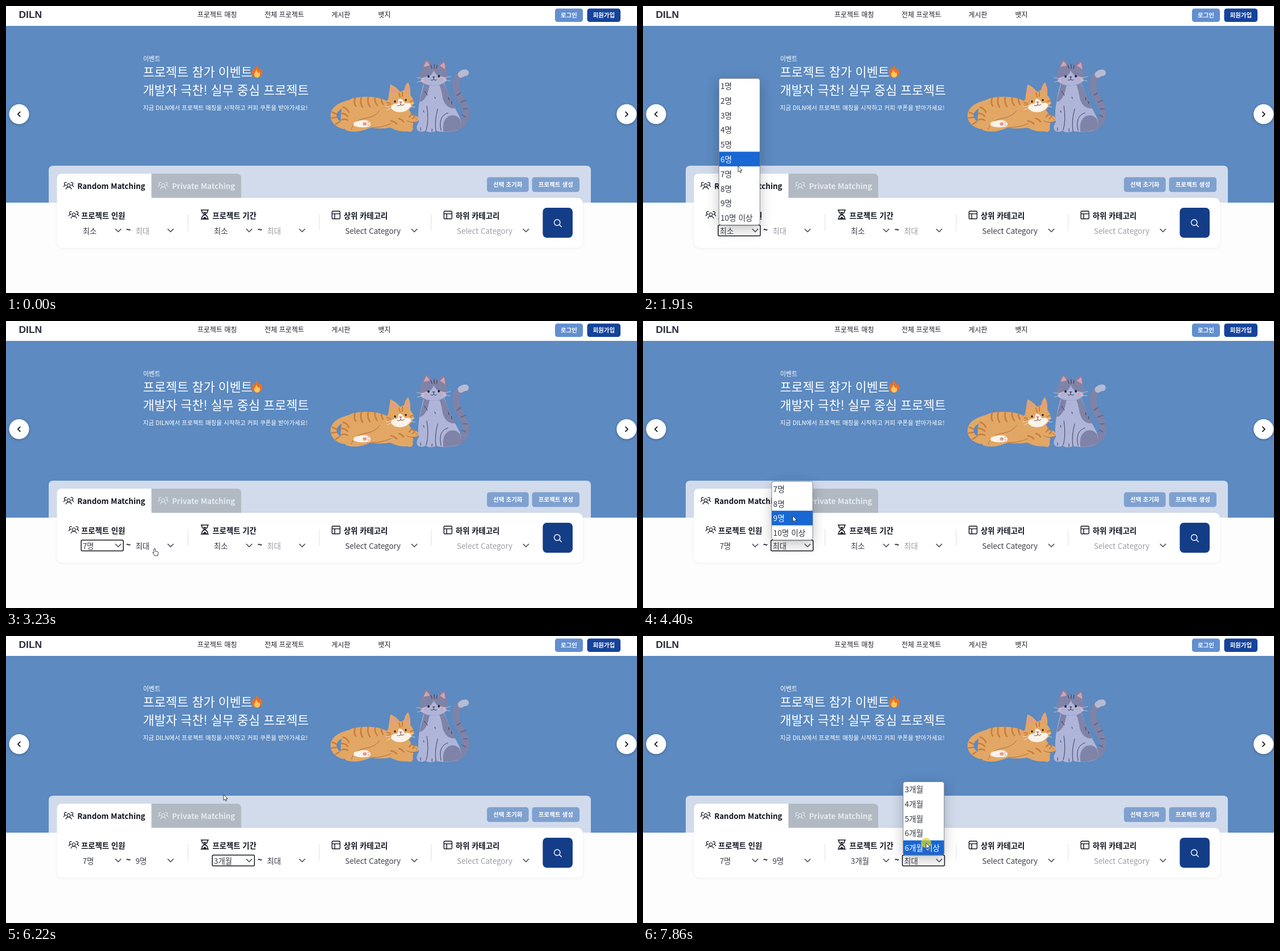
Animation, 1108 px wide and 505 px high, one loop 7.99 s. Source, as an HTML page:

```html
<!DOCTYPE html>
<html lang="ko">
<head>
<meta charset="utf-8">
<title>Project matching</title>
<style>
  html, body { margin: 0; width: 100%; height: 100%; overflow: hidden; background: #fdfdfd; }
  svg { display: block; width: 1108px; height: 505px; }
  text { font-family: "Noto Sans CJK KR", "Noto Sans CJK", "Noto Sans", sans-serif; white-space: pre; }
  .list { filter: drop-shadow(0 7px 11px rgba(0, 0, 0, .24)); }
  .knob { filter: drop-shadow(0 1px 2px rgba(0, 0, 0, .3)); }
  .card { filter: drop-shadow(0 1px 2px rgba(40, 50, 80, .09)); }
  .line { fill: none; stroke-linecap: round; stroke-linejoin: round; }
</style>
</head>
<body>
<svg id="stage" viewBox="0 0 1108 505"></svg>
<script>
const LOOP = 7990, ROW = 25.8, LIST_END = 385.4;
const INK = '#10131f', GREY = '#9b9da5', BODY = '#3b3d49';

const text = (x, y, s, size, fill, weight = 400, anchor = 'start') =>
  `<text x="${x}" y="${y}" font-size="${size}" fill="${fill}" font-weight="${weight}" text-anchor="${anchor}">${s}</text>`;
const box = (x, y, w, h, r, fill, extra = '') =>
  `<rect x="${x}" y="${y}" width="${w}" height="${h}" rx="${r}" fill="${fill}" ${extra}/>`;
const shape = (d, fill) => `<path d="${d}" fill="${fill}"/>`;
const line = (d, stroke, width = 1) => `<path class="line" d="${d}" stroke="${stroke}" stroke-width="${width}"/>`;
const oval = (x, y, rx, ry, fill) => `<ellipse cx="${x}" cy="${y}" rx="${rx}" ry="${ry}" fill="${fill}"/>`;
const chevron = x => line(`M${x - 4.7} 392.7l4.7 4.7 4.7-4.7`, '#5d606e', 1.8);
const button = (x, y, w, h, fill, label, size) =>
  box(x, y, w, h, 4.5, fill) + text(x + w / 2, y + h / 2 + 3.7, label, size, '#fff', 700, 'middle');

const people = (x, y, color) => `<g transform="translate(${x} ${y})">` +
  `<circle class="line" r="2.9" cy="-.4" stroke="${color}" stroke-width="1.2"/>` +
  line('M-4.8 6.2Q-4.2 2.7 0 2.7T4.8 6.2M-4-5.4A2.4 2.4 0 1 0-5-.9Q-7.8-.6-8.7 2M4-5.4A2.4 2.4 0 1 1 5-.9Q7.8-.6 8.7 2', color, 1.2) + '</g>';
const layout = x => line(`M${x + 1.5} 361h11q1.5 0 1.5 1.5v10.5q0 1.5-1.5 1.5h-11q-1.5 0-1.5-1.5v-10.5q0-1.5 1.5-1.5zM${x} 365.6h14M${x + 4.8} 365.6v9`, INK, 1.4);
const hourglass = line('M342.5 359h13M342.5 375h13M344 359v3q0 2 5 5q5-3 5-5v-3M344 375v-3q0-2 5-5q5 3 5 5v3', INK, 1.5) +
  shape('M345.5 362.5h7l-3.5 3zM345 374.5l4-4 4 4z', INK);

function orangeCat() {
  const fur = '#e2a765', dark = '#c87d3f', cream = '#fbf3ea', pink = '#e59a8f';
  const stripes = ['M613 162q-3 8 1 14', 'M624 160q-3 10 2 18', 'M636 160q-2 10 3 17', 'M648 161q-1 8 4 14',
    'M659 163q0 6 3 10', 'M592 178q7 2 10 9', 'M588 189q8 0 12 5', 'M590 200q6-2 10 1', 'M573 187l7 3', 'M572 197l8-1', 'M579 208l6-4',
    'M676 202q6 1 10 5', 'M690 198q6 2 8 6', 'M712 189q-1 4-4 6', 'M718 192q-1 4-4 6'];
  return line('M605 170Q575 177 575 193Q576 206 592 211', fur, 10.5) +
    shape('M588 192C589 168 605 160 628 160C650 159 664 163 674 171L705 180C717 192 717 209 712 219Q693 224 675 214Q655 217 640 214Q616 225 598 219Q586 210 588 192Z', fur) +
    line('M698 190Q708 198 719 199', fur, 11) + line('M692 208Q700 214 709 216', fur, 11) +
    stripes.map(d => line(d, dark, 2.6)).join('') +
    line('M606 217Q612 201 628 198Q648 196 656 184M642 214Q660 214 676 207M704 202Q713 207 722 203M719 197l3 3', '#a9683a', .9) +
    shape('M611 205Q624 199 636 202Q643 207 638 212Q622 216 610 210Z', cream) +
    oval(630, 207.5, 3.5, 3, pink) + oval(636, 204.5, 1.2, 1.2, pink) + oval(636.5, 209.5, 1.2, 1.2, pink) +
    shape('M671 164L675 138Q684 141 692 151L699 148Q701 138 706 134Q711 143 710 157Q716 163 716 171Q708 188 692 188Q672 187 667 173Q668 167 671 164Z', fur) +
    shape('M675 154L678 143Q684 146 687 151ZM701 148L705.5 139Q708 147 707 154Z', pink) +
    shape('M690 163Q697 163 700 171Q712 169 711 176Q704 187 692 187Q679 186 676 179Q678 171 687 172Z', cream) +
    line('M690 153l2 7M696 151l0 8M669 170l6 1M670 175l5-1M715 166l-5 2', dark, 2) +
    oval(683, 168, 1.6, 2, '#2a211e') + oval(702, 165.5, 1.6, 2, '#2a211e') +
    shape('M690 168h6l-3 3.5z', '#d9726b') + line('M693 171.5v2.5q-3 3-6 1M693 174q3 2 6-.5', '#5b3a31', .9) +
    line('M679 175l-12 2M680 178l-11 5M706 173l11-2M707 176l11 2', '#fff', .6);
}

function greyCat() {
  const pale = '#afb5d8', dark = '#7f83a8', ink = '#32344d', pink = '#d9a0ae';
  return line('M788 215C809 207 813 188 801 169C786 146 786 127 803 118', dark, 12) +
    line('M799 120.5Q803 117 807 117.5', '#b7bbd2', 11.5) +
    line('M792 157l6-4M799 169l8-3M803 181l7 0M801 192l6 3', '#65698d', 2.2) +
    shape('M734 134C728 155 721 185 725 204Q718 215 724 220Q731 223 737 219Q744 225 755 220Q780 224 795 217Q802 207 796 194Q783 171 769 134Z', pale) +
    shape('M768 134Q778 157 790 180Q773 182 767 163Q764 145 761 139ZM734 138Q729 157 726 169Q736 167 741 151L744 138Z', dark) +
    shape('M768 221Q765 202 777 194Q789 189 797 199Q801 210 795 217Q781 222 768 221Z', dark) +
    line('M738 218Q743 200 739 176M755 220Q752 203 758 181M764 219Q758 194 776 188M728 214v5M748 216v5', ink, .9) +
    shape('M727 119Q731 101 738 92Q745 97 748 104L757 104Q764 97 770 95Q774 106 774 117Q779 130 768 137Q752 143 734 138Q722 131 727 119Z', dark) +
    shape('M733 107L738 97Q742 100 744 105ZM762 105L769 99Q771 104 771 111Z', pink) +
    shape('M751 113Q755 124 766 124Q775 126 773 132Q765 140 750 140Q734 139 728 132Q729 125 739 124Q749 123 751 113Z', pale) +
    oval(736, 130, 3.5, 2, pink) + oval(766, 129, 3.5, 2, pink) +
    oval(742, 124, 1.9, 2.2, '#22233a') + oval(760, 123.5, 1.9, 2.2, '#22233a') +
    shape('M748.5 124h5l-2.5 3z', '#4d3e57') + line('M751 127v2q-2 3-5 1M751 129q2 3 5 1', ink, 1) +
    line('M746 104l2 6M752 103v7M757 104l-1 6M735 150l2 3M738 154l2 3M777 161l1 4M782 168l1 4M753 160l1 3M733 184l1 3', ink, 1) +
    line('M734 128l-13-2M734 131l-12 3M768 127l13-3M768 130l12 2', '#e4e6f2', .6);
}

const flame = shape('M440 126Q431 125 432 116Q433 111 436 108Q436 112 438 113Q437 107 442 104Q442 109 446 112Q447 111 447 109Q451 114 450 119Q448 126 440 126Z', '#e8702a') +
  shape('M441 126Q435 125 436 119Q438 116 440 112Q441 117 444 118L445 116Q447 121 445 124Q443 126 441 126Z', '#fbc85a');

const knob = (x, dir) => `<circle class="knob" cx="${x}" cy="190.3" r="17.5" fill="#fff"/>` +
  line(`M${x - 1.8 * dir} 186.3l${4 * dir} 4 ${-4 * dir} 4`, '#111', 1.7);

const page =
  box(0, 0, 1108, 35, 0, '#fff') +
  `<text x="22.5" y="21.3" font-size="17.4" font-weight="700" fill="#2b2d3c" style="font-family:'Liberation Sans',sans-serif">DILN</text>` +
  [[336, '프로젝트 매칭'], [454, '전체 프로젝트'], [571.5, '게시판'], [653.5, '뱃지']]
    .map(([x, s]) => text(x, 19.8, s, 12, '#20222c')).join('') +
  button(964, 4.5, 49, 23.5, '#628fd0', '로그인', 10.5) +
  button(1020.5, 4.5, 58.5, 23.5, '#15439b', '회원가입', 10.5) +
  box(0, 35, 1108, 311, 0, '#5c8ac1') +
  text(240.7, 97.2, '이벤트', 11, '#fff') +
  text(240.5, 124, '프로젝트 참가 이벤트', 21.75, '#fff', 500) + flame +
  text(240.5, 156.3, '개발자 극찬! 실무 중심 프로젝트', 21.75, '#fff', 500) +
  text(240.5, 182.8, '지금 <tspan font-weight="500">DILN</tspan>에서 프로젝트 매칭을 시작하고 커피 쿠폰을 받아가세요!', 10.5, '#fff') +
  orangeCat() + greyCat() + knob(23, -1) + knob(1089.7, 1) +
  shape('M75 346V289q0-8 8-8H1019q8 0 8 8V346z', '#d1dbec') +
  `<g class="card">${box(89.5, 337.5, 923.5, 88, 9, '#fff')}</g>` +
  shape('M89.5 350V304q0-9 9-9H255.5V350z', '#fff') +
  shape('M255.5 337.5V295H405q8 0 8 8V337.5z', '#b1bac2') +
  people(110, 316, INK) + text(125.3, 322, 'Random Matching', 13.3, INK, 700) +
  people(276, 316, '#e3e7ec') + text(291.5, 322, 'Private Matching', 13.3, '#e6eaee', 700) +
  button(844.5, 301.3, 73.3, 26, '#7fa1cf', '선택 초기화', 10.5) +
  button(923.7, 301.3, 83.3, 26, '#7fa1cf', '프로젝트 생성', 10.5) +
  people(119, 367.3, INK) + hourglass + layout(572.5) + layout(769) +
  [[132, '프로젝트 인원'], [362.5, '프로젝트 기간'], [593, '상위 카테고리'], [789.5, '하위 카테고리']]
    .map(([x, s]) => text(x, 373.8, s, 13.3, INK, 700)).join('') +
  [319.5, 550, 746.5].map(x => line(`M${x} 367v28.5`, '#dfe1e8', 1)).join('') +
  [197, 289, 427, 520, 717, 913].map(chevron).join('') +
  text(210.8, 399.3, '~', 14.5, INK, 700) + text(441.5, 399.3, '~', 14.5, INK, 700) +
  text(595.5, 400.7, 'Select Category', 13.3, BODY) + text(791.8, 400.7, 'Select Category', 13.3, GREY) +
  box(942.5, 355, 52.5, 52.7, 7, '#143d87') +
  line('M973 381a5.2 5.2 0 1 1-10.4 0a5.2 5.2 0 1 1 10.4 0M971.7 384.8l3.6 3.6', '#fff', 1.4);

const count = (from, to, unit) => Array.from({ length: to - from + 1 }, (_, i) => from + i + unit);
const months = from => [...count(from, 6, '개월'), '6개월 이상'];
const members = from => [...count(from, 9, '명'), '10명 이상'];

// live: the time from which the field can be used
const fields = [
  { x: 132, hint: '최소', live: 0, open: 1530, close: 2580, value: '7명', items: members(1) },
  { x: 224.7, hint: '최대', live: 2580, open: 3460, close: 4590, value: '9명', items: members(7) },
  { x: 362.3, hint: '최소', live: 0, open: 4990, close: 6150, value: '3개월', items: months(1) },
  { x: 455.5, hint: '최대', live: 6150, open: 7190, close: LOOP, value: '', items: months(3) },
];
const clicks = [[1370, 1530], [2450, 2580], [3350, 3460], [4530, 4590], [4860, 4990], [5950, 6150], [7060, 7190], [7860, LOOP]];

const path = [
  [130, 1033, 498], [350, 720, 450], [600, 300, 405], [820, 160, 422], [1020, 160, 422], [1370, 160, 402],
  [1530, 160, 402], [1910, 167, 282], [2260, 167, 293], [2580, 167, 293], [3080, 245, 397], [3230, 261, 400],
  [3340, 264, 399], [3460, 264, 399], [3910, 262, 325], [4400, 263, 343], [4590, 263, 343], [4720, 360, 398],
  [4860, 390, 397], [4990, 390, 397], [5260, 393, 377], [5530, 388, 297], [5750, 383, 250], [5950, 382, 279],
  [6220, 382, 279], [6560, 597, 397], [6910, 505, 397], [7060, 497, 396], [7190, 497, 396], [7400, 495, 350],
  [7660, 497, 364], [LOOP, 497, 364],
];

function cursorAt(t) {
  const i = Math.max(1, path.findIndex(p => p[0] > t));
  const [t0, x0, y0] = path[i - 1], [t1, x1, y1] = path[i];
  const u = (t - t0) / (t1 - t0), k = u * u * (3 - 2 * u);
  return { x: x0 + (x1 - x0) * k, y: y0 + (y1 - y0) * k };
}

function drawList({ x, items }, cur) {
  const left = x + 1.3, w = 72, top = LIST_END - items.length * ROW;
  const inside = cur.x > left && cur.x < left + w && cur.y < LIST_END;
  const hot = inside ? Math.floor((cur.y - top) / ROW) : -1;
  const rows = items.map((s, i) => {
    const y = top + i * ROW;
    return (i === hot ? box(left, y, w, ROW, 0, '#1967d2') : '') +
      text(left + 2.6, y + 18.6, s, 13.7, i === hot ? '#fff' : '#343743');
  }).join('');
  const frame = box(left, top, w, LIST_END - top, 4, 'none', 'stroke="#6f737c" stroke-width=".8"');
  return `<clipPath id="clip">${box(left, top, w, LIST_END - top, 4, '#000')}</clipPath>` +
    `<g class="list">${box(left, top, w, LIST_END - top, 4, '#fff')}</g><g clip-path="url(#clip)">${rows}</g>${frame}`;
}

function drawCursor(t, { x, y }) {
  const starts = [...fields.map(f => f.x), 594, 790];
  const hand = y > 385.5 && y < 405 && starts.some((s, i) => x > s && x < s + (i < 4 ? 74 : 130));
  const d = hand
    ? 'M-1.3 1Q0-1 1.3 1V5.2L5.5 6Q6.6 6.4 6.4 8L5.6 11V13H-.6V11.6L-3.5 7.8Q-3.4 6.2-1.3 7.6Z'
    : 'M0 0V10.2L2.4 8L4 11.6L5.6 10.9L4.1 7.4H7.2Z';
  const lit = clicks.some(([a, b]) => t >= a && t < b);
  return `<g transform="translate(${x} ${y})">` +
    (lit ? '<circle r="9" fill="#d8dc32" fill-opacity=".72"/>' : '') +
    `<path d="${d}" fill="#fff" stroke="#25272f" stroke-width=".9" stroke-linejoin="round"/></g>`;
}

function drawLive(t) {
  const cur = cursorAt(t);
  const focus = fields.filter(f => t >= f.open).pop();
  let out = fields.map(f => text(f.x + 2.7, 401, t >= f.close ? f.value : f.hint, 13.4, t >= f.live ? BODY : GREY)).join('');
  if (focus) {
    out += box(focus.x, 385.6, 74, 18.8, 2, 'none', 'stroke="#15171f" stroke-width="1.5"');
    if (t < focus.close) out += drawList(focus, cur);
  }
  return out + (t >= 130 ? drawCursor(t, cur) : '');
}

const stage = document.getElementById('stage');
stage.innerHTML = page + '<g id="live"></g>';
const live = document.getElementById('live');
const start = performance.now();
function tick() {
  live.innerHTML = drawLive((performance.now() - start) % LOOP);
  requestAnimationFrame(tick);
}
tick();
</script>
</body>
</html>
```
